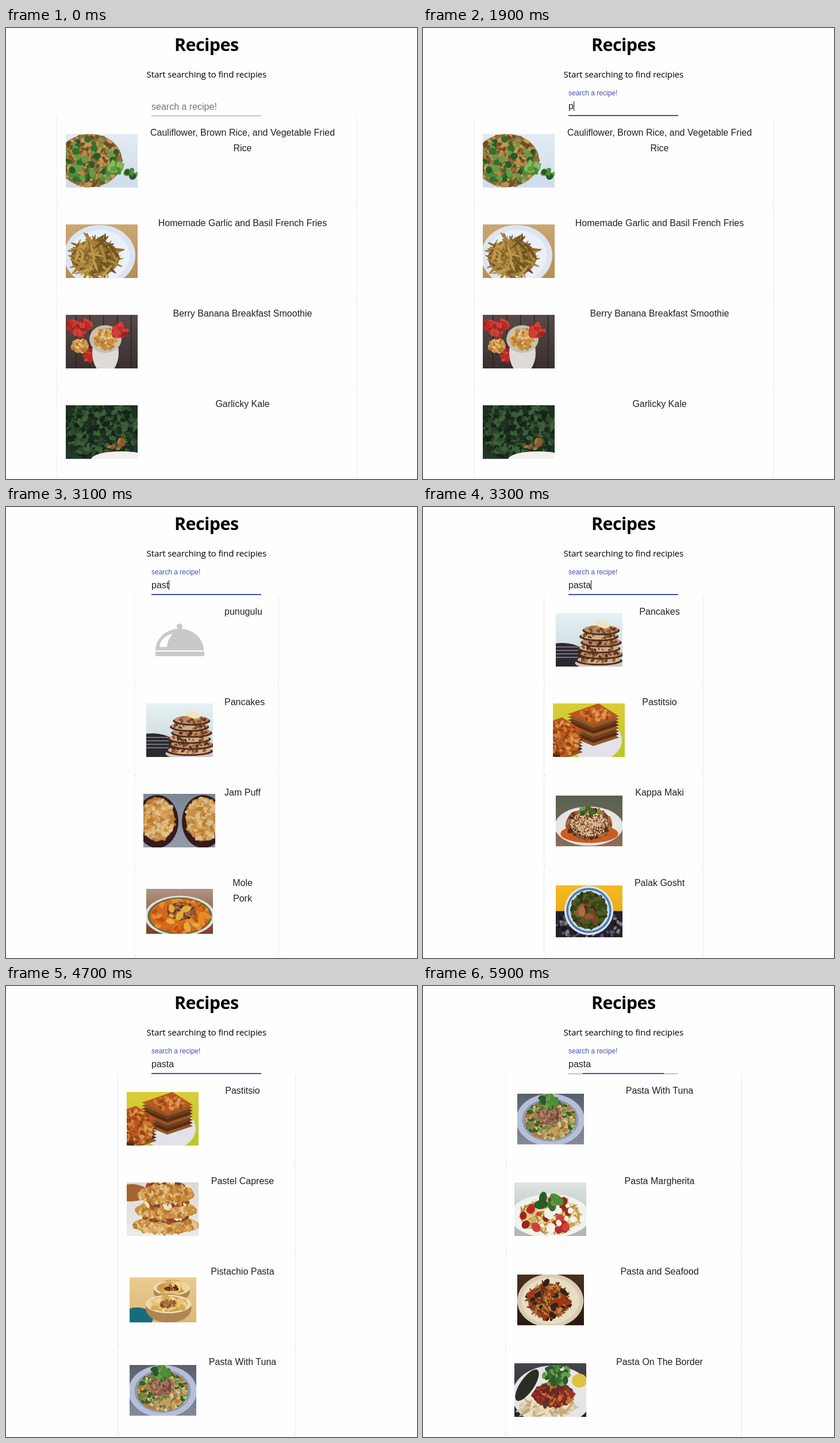
An HTML page with a canvas for the animation above (6000 ms loop, 715 px wide and 783 px high).

```html
<!DOCTYPE html>
<html lang="en">
<head>
<meta charset="utf-8">
<title>Recipes</title>
<style>
  html, body { margin: 0; width: 100%; height: 100%; overflow: hidden; background: #fefefe; }
  canvas, svg { position: absolute; left: 0; top: 0; display: block; }
  text { font: 16px "Liberation Sans", Arial, sans-serif; fill: #212121; }
  #head { font: 700 30.5px "Open Sans", "Noto Sans", sans-serif; letter-spacing: -.6px; fill: #000; }
  #intro { font: 15.2px "Open Sans", "Noto Sans", sans-serif; letter-spacing: -.18px; fill: #000; }
</style>
</head>
<body>
<canvas id="stage" width="715" height="783"></canvas>
<svg width="715" height="783" viewBox="0 0 715 783">
  <text id="head" x="348.8" y="40" text-anchor="middle">Recipes</text>
  <text id="intro" x="348.8" y="86" text-anchor="middle">Start searching to find recipies</text>
  <text id="label" x="253">search a recipe!</text>
  <text id="typed" x="253" y="141"></text>
  <g id="titles"></g>
</svg>
<script>
const LOOP = 6000, STEP = 100, PITCH = 157;
const PAGE_MID = 348.5, TITLE_MID = 411.5;
const g = document.getElementById('stage').getContext('2d');
const el = id => document.getElementById(id);

function oval(x, y, rx, ry, color, rot = 0) {
  g.fillStyle = color;
  g.beginPath();
  g.ellipse(x, y, rx, ry, rot, 0, Math.PI * 2);
  g.fill();
}
function box(x, y, w, h, color) {
  g.fillStyle = color;
  g.fillRect(x, y, w, h);
}

// Photos are painted in a 125 x 93 space; `spot` is the ellipse that food fills
let seed, spot;
const rnd = () => (seed = seed * 16807 % 2147483647) / 2147483647;
const pick = list => list[Math.floor(rnd() * list.length)];

function ground(top, bottom) {
  const fill = g.createLinearGradient(0, 0, 0, 93);
  fill.addColorStop(0, top);
  fill.addColorStop(1, bottom);
  box(0, 0, 125, 93, fill);
}
function at(x, y, rx, ry) {
  spot = { x, y, rx, ry };
}
function disc(color, size = 1) {
  oval(spot.x, spot.y, spot.rx * size, spot.ry * size, color);
}
function plate(color, x = 62, y = 52, rx = 62, ry = 44) {
  at(x, y, rx, ry);
  disc(color);
  at(x, y, rx * .75, ry * .75);
}
// Sprinkles small ovals over a share of the spot
function garnish(colors, share = .8, size = 4, cover = .4, long = 1.6) {
  const n = spot.rx * spot.ry * share * share * cover / (size * size * long) * 2;
  for (let i = 0; i < n; i++) {
    const a = rnd() * Math.PI * 2, r = Math.sqrt(rnd()) * share, s = size * (.6 + .7 * rnd());
    oval(spot.x + Math.cos(a) * r * spot.rx, spot.y + Math.sin(a) * r * spot.ry,
      s * long, s, pick(colors), rnd() * Math.PI);
  }
}
function food(colors, size = 3, long = 1.6) {
  disc(colors[0]);
  garnish(colors, .95, size, 2, long);
}
// A block of layers whose top face is a skewed square
function slab(x, y, w, h, crust, layers) {
  for (let i = 7; i >= 0; i--) {
    const top = y + i * h / 14;
    g.fillStyle = i ? layers[i % layers.length] : crust[0];
    g.beginPath();
    g.moveTo(x, top + h * .25);
    g.lineTo(x + w * .6, top);
    g.lineTo(x + w, top + h * .3);
    g.lineTo(x + w * .5, top + h * .5);
    g.fill();
  }
  at(x + w * .52, y + h * .26, w * .3, h * .14);
  garnish(crust, 1, 2.5, 1);
}

const leaf = ['#356f2c', '#4f8b38', '#6a9a48', '#285a28'];
const noodle = ['#c8a552', '#e4cd85', '#b08a3e', '#f0e0a6'];
const roast = ['#7a4326', '#8f5732', '#562a1a', '#a8703f'];
const gold = ['#c98f43', '#d9a75c', '#b57730', '#e6c284'];
const red = ['#b92c26', '#d0403a', '#98251f'];

const photos = {
  rice() {
    ground('#e2ebf3', '#cfdcea');
    at(42, 46, 56, 46);
    food(['#8d6a3a', '#b98a4b', '#6c4d24', '#c69a5c']);
    garnish(leaf, .9, 5, .4, 1.1);
    at(86, 58, 14, 11);
    food(['#5f9c3e', '#86b959', '#4a8731']);
    at(113, 66, 12, 9);
    garnish(leaf, 1, 5, 1, 1);
  },
  fries() {
    ground('#caa873', '#b68d55');
    plate('#dce4f2', 59, 54, 62, 53);
    disc('#eaf0f8', 1.12);
    at(51, 58, 42, 32);
    food(['#8b692c', '#a9853f', '#c0994f', '#6f5423'], 2.2, 7);
  },
  smoothie() {
    ground('#564b49', '#39302f');
    for (let x = 17; x < 125; x += 24) box(x, 0, 1.5, 93, '#2a2424');
    for (let i = 0; i < 4; i++) {
      at(12 + i * 11, 18 + (i % 2) * 10 + (i > 2 ? 42 : 0), 11, 10);
      food(red);
    }
    at(25, 54, 15, 11);
    food(gold, 2);
    plate('#dedad5', 69, 66, 23, 36);
    plate('#c2beb9', 69, 42, 28, 24);
    food(gold, 2.5);
    at(93, 28, 13, 12);
    food(red);
  },
  kale() {
    ground('#1d3020', '#24382a');
    at(62, 42, 70, 55);
    food(['#1c2f20', '#2d4a2c', '#14241a', '#3d5e38'], 3.5);
    oval(96, 94, 52, 14, '#f3f1ef');
    at(85, 69, 20, 9);
    garnish(['#a8763e', '#8a5c30'], 1, 4);
  },
  cloche() {
    const grey = '#c9c9c9';
    oval(63, 23.5, 5, 5, grey);
    g.beginPath();
    g.ellipse(63, 65, 42, 38, 0, Math.PI, 0);
    g.fill();
    box(21, 67, 85, 8, grey);
    g.fillStyle = '#fefefe';
    g.beginPath();
    g.moveTo(28, 59);
    g.quadraticCurveTo(30, 41, 51, 36);
    g.quadraticCurveTo(42, 46, 41, 59);
    g.fill();
  },
  pancakes() {
    ground('#e6f1f3', '#c7d3d8');
    oval(12, 88, 56, 36, '#2b2830');
    for (let y = 58; y < 82; y += 6) box(0, y, 42, 2, '#77737f');
    oval(82, 87, 46, 10, '#cfc6bf');
    for (let i = 0; i < 6; i++) {
      at(81 + i % 2 * 4, 83 - i * 10.5, 44 - i * 1.8, 8);
      disc('#4b2b25');
      spot.y -= 2;
      disc(i % 2 ? '#b98e64' : '#d2ae84', .92);
      garnish(roast, .8, 2);
    }
    oval(88, 20, 13, 6, '#f1e4bb', .2);
  },
  puff() {
    ground('#7d8794', '#929ba6');
    for (const x of [24, 104]) {
      oval(x, 48, 37, 46, '#35191c');
      at(x, 44, 30, 38);
      food(gold.map(c => c + 'cc').concat('#d6bd8a'), 3);
    }
  },
  mole() {
    ground('#b09584', '#7a4126');
    plate('#e6ddd2', 63, 56, 66, 42);
    disc('#4d7250', 1.22);
    disc('#d4681e', 1.14);
    garnish(['#e88c2a', '#c0500f'], 1.1, 4);
    at(66, 46, 27, 18);
    food(roast);
    spot.y += 14;
    garnish(['#e3ac3c'], 1.3, 5, .15);
  },
  pastitsio() {
    ground('#d9cd39', '#b8c923');
    plate('#e3e2e9', 74, 64, 46, 36);
    const crust = ['#b9581f', '#cf7a36', '#9a4114', '#dc9850'];
    const layers = ['#5b2a12', '#8f582a', '#6f3c1c'];
    slab(26, 0, 89, 74, crust, layers);
    slab(-38, 24, 90, 76, crust, layers);
    at(18, 66, 26, 24);
    garnish(crust, 1, 3, 1.5);
  },
  kappa() {
    ground('#566052', '#8c6d54');
    plate('#e6e5e4', 62, 56, 64, 36);
    oval(63, 70, 54, 17, '#cf5a20');
    at(62, 52, 43, 28);
    food(roast);
    garnish(['#ddc6a0'], .8, 1);
    at(64, 30, 22, 9);
    garnish(leaf, 1, 3);
  },
  palak() {
    ground('#f4b923', '#e89d10');
    box(0, 46, 125, 47, '#23232e');
    at(62, 72, 65, 24);
    garnish(['#4c5067', '#171722', '#8d776f'], 1, 3);
    at(62, 45, 46, 44);
    ['#dfe6ef', '#4777b3', '#c9d8ea'].forEach((color, i) => disc(color, 1 - i * .08));
    at(62, 45, 34, 33);
    food(['#394719', '#2c3712', '#4d5a22']);
    garnish(roast, .65, 5);
  },
  pastel() {
    ground('#d9d8d7', '#edebea');
    oval(8, 18, 30, 15, '#a4632f');
    for (let i = 0; i < 3; i++) {
      at(68, 74 - i * 26, 58 - i * 4, 15);
      food(gold, 2.5);
      spot.y -= 14;
      disc('#7d4326', .7);
      garnish(['#efe1bd', '#aa4830', '#c98f43'], .8, 3);
    }
    at(70, 18, 46, 14);
    food(gold, 2.5);
  },
  pistachio() {
    ground('#eacb90', '#ddb777');
    oval(14, 84, 30, 22, '#176c7c');
    for (const [x, y, r] of [[79, 22, 34], [73, 55, 43]]) {
      oval(x, y + r * .2, r, r * .7, '#ad8651');
      plate('#efdcb4', x, y, r, r * .45);
      disc('#c99848', 1.1);
      garnish(['#e7c475', '#f1d591', '#d6aa58'], 1, 5, 1.5);
      garnish(roast, .5, 2, 1);
    }
  },
  tuna() {
    ground('#59606c', '#858b98');
    plate('#b6bfd9', 62, 48, 64, 48);
    disc('#9299ad', 1.1);
    food(['#7e7949', '#6f9a4b', '#c5cf9e', '#385f28', '#c8a060', '#b8793a'], 3);
    at(60, 40, 24, 17);
    food(['#8f604a', '#a1735c', '#744636', '#b58a70'], 2, 2.5);
    at(57, 16, 18, 13);
    garnish(leaf, 1, 4, 1);
  },
  margherita() {
    ground('#dfe5e1', '#aeb4ae');
    plate('#f1f1ef', 62, 58, 70, 38);
    food(noodle, 1.5, 6);
    garnish(red, 1, 6, .3, 1.2);
    garnish(['#f4f1e8'], .9, 5, .2, 1.2);
    at(60, 33, 20, 8);
    garnish(leaf, 1, 6, 1);
  },
  seafood() {
    ground('#493022', '#2b180e');
    plate('#d8cbb1', 62, 48, 62, 49);
    disc('#e8dcc3', 1.16);
    at(58, 48, 38, 32);
    food(['#8a4a20', '#c58a45', '#6a3218', '#a85f2b'], 1.7, 5);
    garnish(['#33231c', '#9f3717'], 1.1, 4, .3);
  },
  border() {
    ground('#43454c', '#242327');
    plate('#e6e4e5', 66, 56, 70, 52);
    oval(113, 30, 13, 12, '#e0c040');
    at(58, 75, 50, 15);
    food(['#d8c7a2', '#ede0c1', '#c2aa7c'], 2, 6);
    at(68, 55, 36, 21);
    food(['#832722', '#9d302a', '#6e231d', '#b8762f', '#503d2a']);
    at(75, 20, 24, 15);
    garnish(leaf, 1, 4, 1.6);
    oval(22, 38, 12, 32, '#2a2d25', .6);
  }
};

// Photos that are smaller than the usual 125 x 93
const narrow = { pancakes: 93, mole: 78, kappa: 88, palak: 90, pistachio: 78, tuna: 88, seafood: 88 };

const lists = [
  { at: 0, left: 87.5, rows: {
    rice: 'Cauliflower, Brown Rice, and Vegetable Fried|Rice',
    fries: 'Homemade Garlic and Basil French Fries',
    smoothie: 'Berry Banana Breakfast Smoothie',
    kale: 'Garlicky Kale' } },
  { at: 3100, left: 223, rows: {
    cloche: 'punugulu', pancakes: 'Pancakes', puff: 'Jam Puff', mole: 'Mole|Pork' } },
  { at: 3300, left: 210, rows: {
    pancakes: 'Pancakes', pastitsio: 'Pastitsio', kappa: 'Kappa Maki', palak: 'Palak Gosht' } },
  { at: 3500, left: 194, rows: {
    pastitsio: 'Pastitsio', pastel: 'Pastel Caprese', pistachio: 'Pistachio Pasta', tuna: 'Pasta With Tuna' } },
  { at: 4800, left: 143, rows: {
    tuna: 'Pasta With Tuna', margherita: 'Pasta Margherita',
    seafood: 'Pasta and Seafood', border: 'Pasta On The Border' } }
];

function drawCard(left, y) {
  const bottom = y + PITCH - .5;
  g.lineWidth = 1;
  g.strokeStyle = '#ebebeb';
  for (const side of [1, -1]) {
    const x = Math.round(side > 0 ? left : PAGE_MID * 2 - left) + .5;
    g.beginPath();
    g.moveTo(x + side, y + 1);
    g.lineTo(x, y + 4);
    g.lineTo(x, bottom - 4);
    g.quadraticCurveTo(x, bottom, x + side * 3, bottom);
    g.stroke();
    box(x + side * 1.5 - 1, bottom - 1, 2, 1, '#cfcfcf');
  }
}

function drawPhoto(name, cx, cy) {
  const w = narrow[name] ? 116 : 125, h = narrow[name] || 93;
  seed = [...name].reduce((sum, ch) => sum * 31 + ch.charCodeAt(0), 7) % 2147483647;
  g.save();
  g.translate(Math.round(cx - w / 2), Math.round(cy - h / 2));
  g.beginPath();
  g.rect(0, 0, w, h);
  g.clip();
  g.scale(w / 125, h / 93);
  photos[name]();
  g.restore();
}

// Titles are centred, but a wide word never starts left of its column
function setTitles({ left, rows }) {
  const group = el('titles');
  group.replaceChildren();
  Object.values(rows).forEach((title, row) => title.split('|').forEach((line, i) => {
    const t = document.createElementNS(group.namespaceURI, 'text');
    t.textContent = line;
    group.append(t);
    t.setAttribute('x', Math.max(left + 157, TITLE_MID - t.getComputedTextLength() / 2));
    t.setAttribute('y', 187 + row * PITCH + i * 27);
  }));
}

const HOVER = 800, FOCUS = 1000, CARET_END = 5600, BLUR = 5881;
const keys = [1900, 2300, 2500, 2900, 3200];
const easeOut = x => 1 - (1 - Math.min(1, Math.max(0, x))) ** 3;
const mix = (a, b, k) => a + (b - a) * k;

function drawField(t) {
  const focus = easeOut((t - FOCUS + 50) / 200);
  const pressed = keys.filter(k => t >= k);
  const label = el('label');
  label.setAttribute('y', mix(142, 117, focus));
  label.style.fontSize = mix(16, 12, focus) + 'px';
  label.style.fill = `rgb(${[63, 81, 181].map(c => Math.round(mix(117, c, focus)))})`;
  const typed = el('typed');
  typed.textContent = 'pasta'.slice(0, pressed.length);

  if (t >= HOVER && t < FOCUS + 200) box(253, 151, 191, 2, '#333');
  else box(253, 152, 191, 1, '#949494');
  const width = 191 * (focus - easeOut((t - BLUR) / 200));
  box(PAGE_MID - width / 2, 151, width, 2, '#3f51b5');

  const sinceInput = t - (pressed.at(-1) ?? FOCUS);
  if (t >= FOCUS && t < CARET_END && sinceInput % 1000 < 500) {
    const x = 253 + (pressed.length ? typed.getComputedTextLength() : 0);
    box(Math.round(x), pressed.length ? 127 : 128, 1, 17, '#111');
  }
}

let shownTick, shownList;
function frame() {
  const t = Math.floor(performance.now() % LOOP / STEP) * STEP;
  if (t !== shownTick) {
    shownTick = t;
    const list = lists.findLast(l => t >= l.at);
    if (list !== shownList) setTitles(shownList = list);
    box(0, 0, 715, 783, '#fefefe');
    Object.keys(list.rows).forEach((name, i) => {
      drawCard(list.left, 153 + i * PITCH);
      drawPhoto(name, list.left + 78.5, 230.5 + i * PITCH);
    });
    drawField(t);
  }
  requestAnimationFrame(frame);
}
frame();
</script>
</body>
</html>
```
